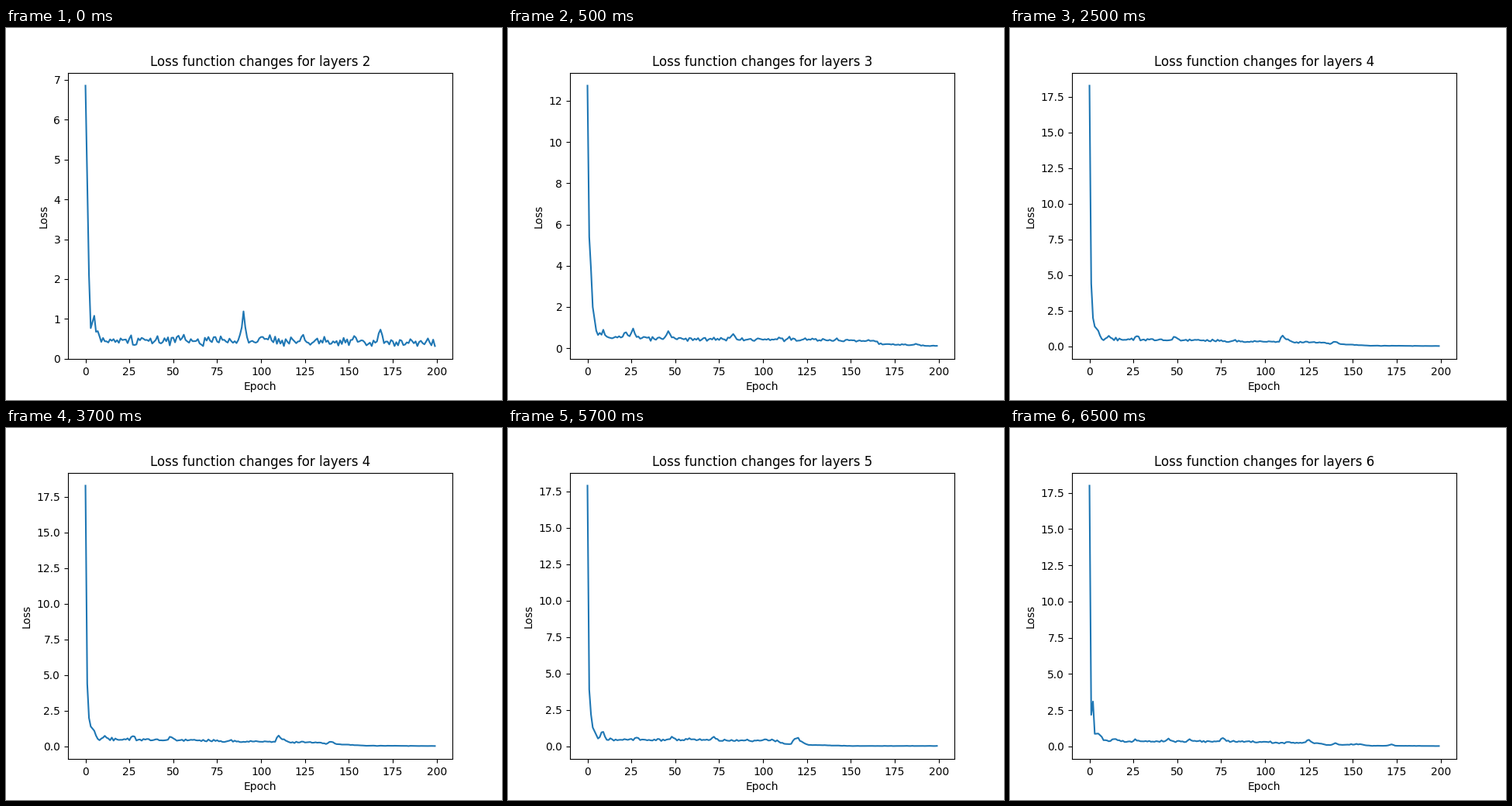
Animation, 640 px wide and 480 px high, one loop 8000 ms. Source, as a matplotlib script:

```python
import numpy as np
import matplotlib.pyplot as plt
from matplotlib.animation import FuncAnimation

EPOCHS = np.arange(200)
INTERVAL = 500
FRAMES = 16


def loss_curve(seed, low, trend, spikes, jitter=0.1):
    """Steep drop and slow decline, with seeded jitter and a few spikes."""
    loss = np.interp(EPOCHS, *zip(*trend))
    noise = np.random.default_rng(seed).normal(0, jitter, EPOCHS.size)
    loss *= 1 + np.where(EPOCHS > 5, noise, 0)
    for epoch, height in spikes.items():
        loss += height * np.exp(-((EPOCHS - epoch) / 1.4) ** 2)
    return np.maximum(loss, low)


CURVES = [
    loss_curve(
        2, 0.32,
        [(0, 6.85), (2, 2.1), (3, 0.77), (5, 1.08), (6, 0.71), (9, 0.46),
         (90, 0.45), (199, 0.40)],
        {52: 0.08, 74: 0.1, 90: 0.65, 100: 0.2, 124: 0.12, 153: 0.18,
         168: 0.28}, jitter=0.14),
    loss_curve(
        3, 0.09,
        [(0, 12.73), (1, 5.4), (2, 3.85), (3, 2.0), (5, 0.85), (12, 0.54),
         (60, 0.46), (130, 0.4), (162, 0.37), (168, 0.19), (199, 0.11)],
        {22: 0.22, 26: 0.34, 46: 0.28, 83: 0.2, 115: 0.13, 187: 0.07}),
    loss_curve(
        4, 0.02,
        [(0, 18.28), (1, 4.4), (2, 2.0), (3, 1.4), (5, 1.1), (7, 0.52),
         (60, 0.43), (100, 0.33), (135, 0.25), (142, 0.17), (160, 0.05),
         (199, 0.03)],
        {11: 0.15, 27: 0.28, 49: 0.22, 110: 0.45, 113: 0.2, 140: 0.15}),
    loss_curve(
        5, 0.01,
        [(0, 17.88), (1, 3.9), (2, 2.2), (3, 1.3), (6, 0.55), (12, 0.48),
         (60, 0.45), (107, 0.4), (112, 0.18), (116, 0.17), (118, 0.52),
         (126, 0.1), (150, 0.03), (199, 0.03)],
        {8.5: 0.45, 28: 0.18, 48: 0.22, 72: 0.22, 101: 0.1, 120: 0.1}),
    loss_curve(
        6, 0.02,
        [(0, 18.0), (1, 2.18), (2, 3.1), (3, 0.87), (5, 0.89), (8, 0.42),
         (20, 0.34), (80, 0.36), (110, 0.28), (130, 0.22), (136, 0.09),
         (154, 0.15), (160, 0.05), (199, 0.03)],
        {14: 0.15, 26: 0.15, 45: 0.14, 57: 0.13, 76: 0.26, 125: 0.26,
         140: 0.12, 172: 0.1}),
]

fig, ax = plt.subplots(figsize=(6.4, 4.8), dpi=100)
line, = ax.plot(EPOCHS, CURVES[0])
ax.set_xlabel("Epoch")
ax.set_ylabel("Loss")


def update(frame):
    # The first plot shows for one tick, the others for four each.
    index = (frame + 3) // 4
    loss = CURVES[index]
    margin = 0.05 * np.ptp(loss)
    line.set_ydata(loss)
    ax.set_ylim(loss.min() - margin, loss.max() + margin)
    ax.set_title(f"Loss function changes for layers {index + 2}")
    return line,


anim = FuncAnimation(fig, update, frames=FRAMES, interval=INTERVAL,
                     repeat=True, repeat_delay=0, blit=False)
plt.show()
```
